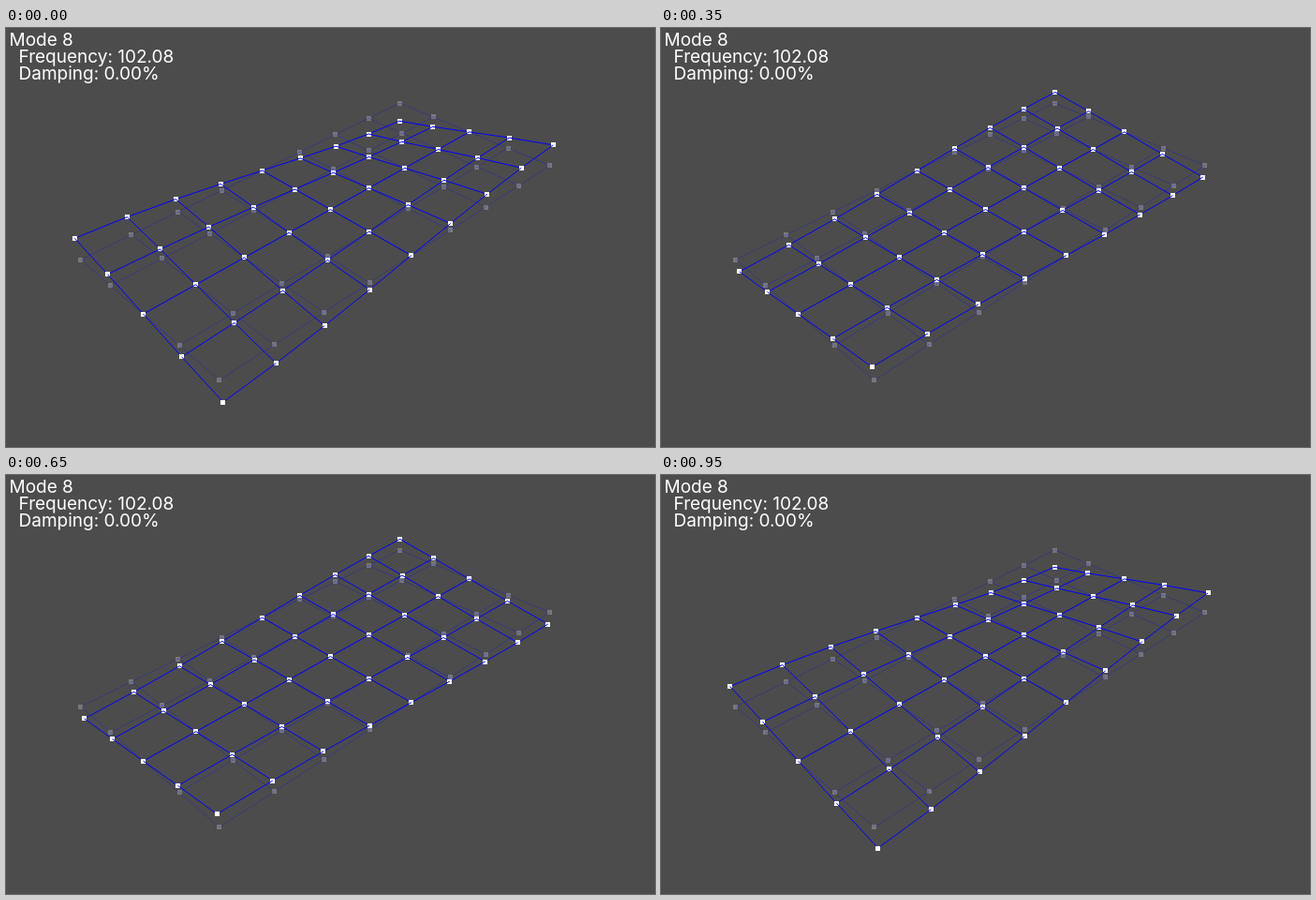
Recreate the animation shown at these times as an HTML page with a canvas. Size 693 px wide and 447 px high, loop 1 s.

```html
<!DOCTYPE html>
<html lang="en">
<head>
<meta charset="utf-8">
<title>Mode shape</title>
<style>
  html, body { margin: 0; width: 100%; height: 100%; overflow: hidden; background: #4c4c4c; }
  canvas { display: block; }
</style>
</head>
<body>
<canvas id="stage" width="693" height="447"></canvas>
<script>
const ctx = document.getElementById("stage").getContext("2d");
const LOOP = 1000, STEP = 50, COLS = 8, ROWS = 4;

// Perspective view of plate coordinates: u, v in -1..1, w = lift
function project(u, v, w) {
  const d = 1 + 0.1485 * u - 0.084 * v - 0.0195 * w;
  return [
    (346.5 + 221.7 * u + 50 * v - 7.7 * w) / d,
    (193.6 - 66.2 * u + 28.7 * v - 25.6 * w) / d
  ];
}

// Odd curve through -1, 0 and 1; larger k bends it more
const bend = (x, k) => Math.sin(k * x) / Math.sin(k);

// Torsion shape of the plate, scaled by amp
function node(i, j, amp) {
  const u = i / COLS * 2 - 1, v = j / ROWS * 2 - 1;
  return project(u, v, amp * bend(u, 1.25) * bend(v, 0.6));
}

function line(a, b) {
  ctx.beginPath();
  ctx.moveTo(...a);
  ctx.lineTo(...b);
  ctx.stroke();
}

// Far to near, so each square covers only the lines behind it
function mesh(amp, alpha) {
  ctx.globalAlpha = alpha;
  for (let i = COLS; i >= 0; i--) {
    for (let j = 0; j <= ROWS; j++) {
      const p = node(i, j, amp);
      ctx.fillRect(Math.floor(p[0] - 2), Math.floor(p[1] - 2), 5, 5);
      if (i > 0) line(p, node(i - 1, j, amp));
      if (j < ROWS) line(p, node(i, j + 1, amp));
    }
  }
  ctx.globalAlpha = 1;
}

function draw(now) {
  const t = Math.floor(now % LOOP / STEP) * STEP;
  const amp = Math.cos(2 * Math.PI * t / LOOP);

  ctx.fillStyle = "#4c4c4c";
  ctx.fillRect(0, 0, 693, 447);
  ctx.fillStyle = "#fff";
  ctx.strokeStyle = "#00f";
  ctx.lineWidth = 1;
  if (Math.abs(amp) > 0.001) mesh(0, 0.25);
  mesh(amp, 1);

  ctx.font = "19px Inter, sans-serif";
  ctx.fillText("Mode 8", 3.5, 19);
  ctx.fillText("Frequency: 102.08", 13.5, 37);
  ctx.fillText("Damping: 0.00%", 13.5, 55);
  requestAnimationFrame(draw);
}
requestAnimationFrame(draw);
</script>
</body>
</html>
```
